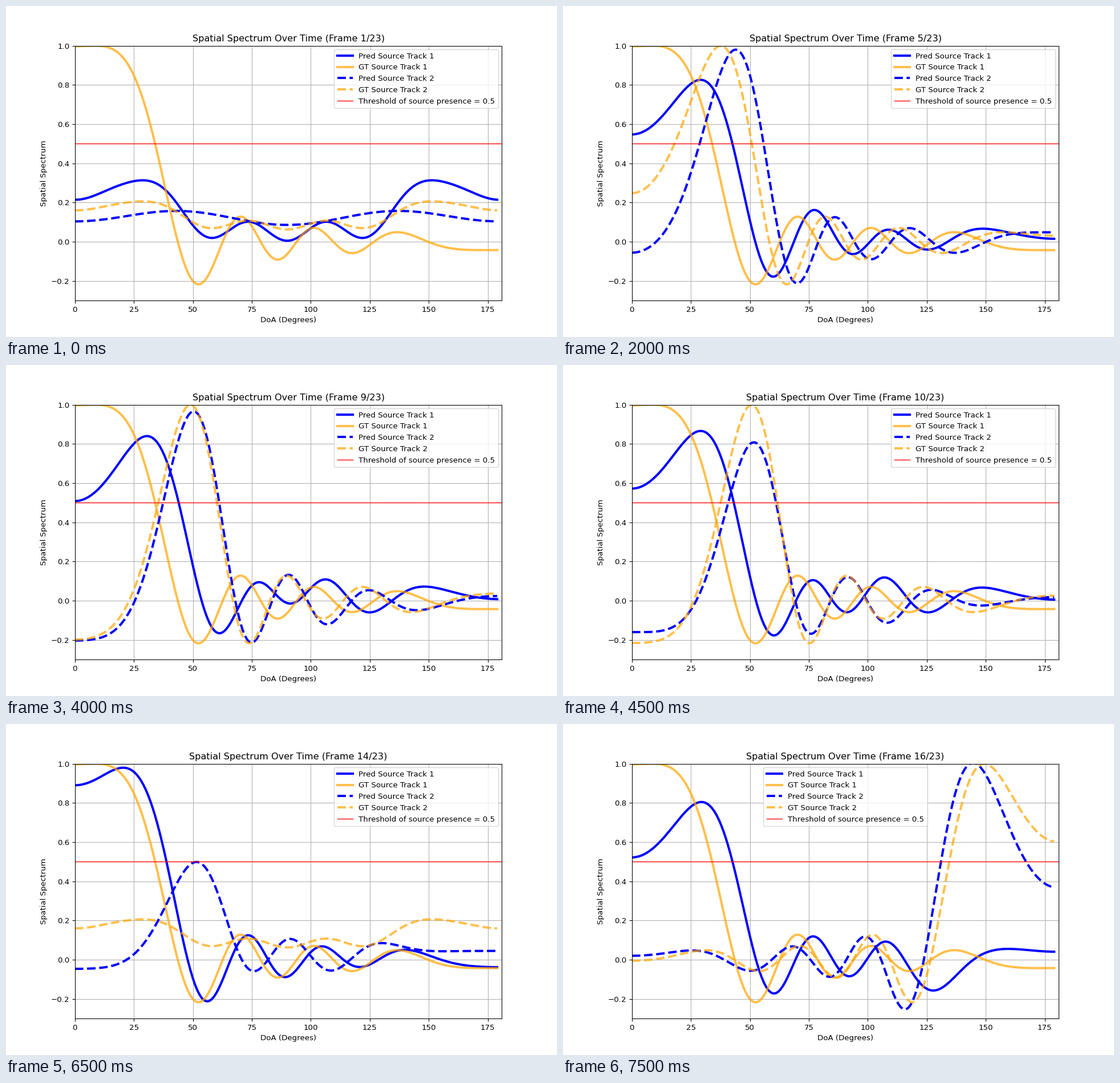
A matplotlib script that plays this animation: 966x580 px, repeating every 8000 ms.

```python
import numpy as np
import matplotlib.pyplot as plt
from matplotlib.animation import FuncAnimation

STEPS, TOTAL, INTERVAL = 16, 23, 500
DPI = 96.6
SHARPNESS = 3.78  # of a beam in cos(angle)

degrees = np.arange(180)
theta = np.radians(degrees)

# Key poses of the two estimates: beam angle, beam gain, echo gain
TRACK1 = dict(step=[0, 1, 4, 6, 8, 11, 13, 15],
              angle=[29, 29, 29, 29.3, 30.8, 26.3, 20.5, 29.3],
              gain=[0, .85, .79, .85, .82, .895, .98, .765],
              echo=[0, .05, .055, .09, .08, .02, .02, -.13])
TRACK2 = dict(step=[1, 2, 4, 6, 8, 11, 13, 14, 15],
              angle=[44, 44, 44, 41.5, 50.3, 54.3, 51.5, 144, 144.7],
              gain=[0, .96, .98, .99, .964, .445, .43, .98, .998],
              echo=[0, 0, 0, 0, -.04, -.09, -.07, -.04, -.04])


def beam(angle):
    return np.sinc(SHARPNESS * (np.cos(theta) - np.cos(np.radians(angle))))


def ripple(*coefs):
    """Symmetric spectrum of a silent source, as a cosine series."""
    return sum(c * np.cos(2 * k * theta) for k, c in enumerate(coefs))


silent = ripple(.1366, .0615, -.0062, -.0288, -.0118, .0159, -.0071)
silent1 = 2.15 * silent - .13
silent2 = ripple(.126, .009, -.031)


def estimate(step, track, rest, echo_angle):
    angle, gain, echo = (np.interp(step, track["step"], track[name])
                         for name in ("angle", "gain", "echo"))
    return (gain * beam(angle) + echo * beam(echo_angle)
            + (1 - gain) ** 1.5 * rest)


def true_source2(step):
    if step < 2 or 10 < step < 14:
        return silent
    return beam(np.interp(step, [2, 4, 6, 8, 10, 14],
                          [35, 37.7, 40.9, 49, 52.5, 149.4]))


fig, ax = plt.subplots(figsize=(966 / DPI, 580.001 / DPI), dpi=DPI)
pred = dict(color="blue", lw=3)
truth = dict(color="orange", lw=3, alpha=.7)
pred1, = ax.plot(degrees, silent1, label="Pred Source Track 1", **pred)
ax.plot(degrees, beam(8.7), label="GT Source Track 1", **truth)
pred2, = ax.plot(degrees, silent2, "--", label="Pred Source Track 2", **pred)
truth2, = ax.plot(degrees, silent, "--", label="GT Source Track 2", **truth)
ax.axhline(.5, color="red", lw=1, label="Threshold of source presence = 0.5")
ax.set(xlim=(0, 181), ylim=(-.3, 1), xlabel="DoA (Degrees)",
       ylabel="Spatial Spectrum")
ax.grid(True)
ax.legend(loc="best")
title = ax.set_title("")


def update(step):
    pred1.set_ydata(estimate(step, TRACK1, silent1, 61 + 4.7 * step))
    pred2.set_ydata(estimate(step, TRACK2, silent2, 112))
    truth2.set_ydata(true_source2(step))
    title.set_text(f"Spatial Spectrum Over Time (Frame {step + 1}/{TOTAL})")
    return pred1, pred2, truth2, title


anim = FuncAnimation(fig, update, frames=STEPS, interval=INTERVAL,
                     init_func=lambda: update(0), repeat=True)
plt.show()
```
